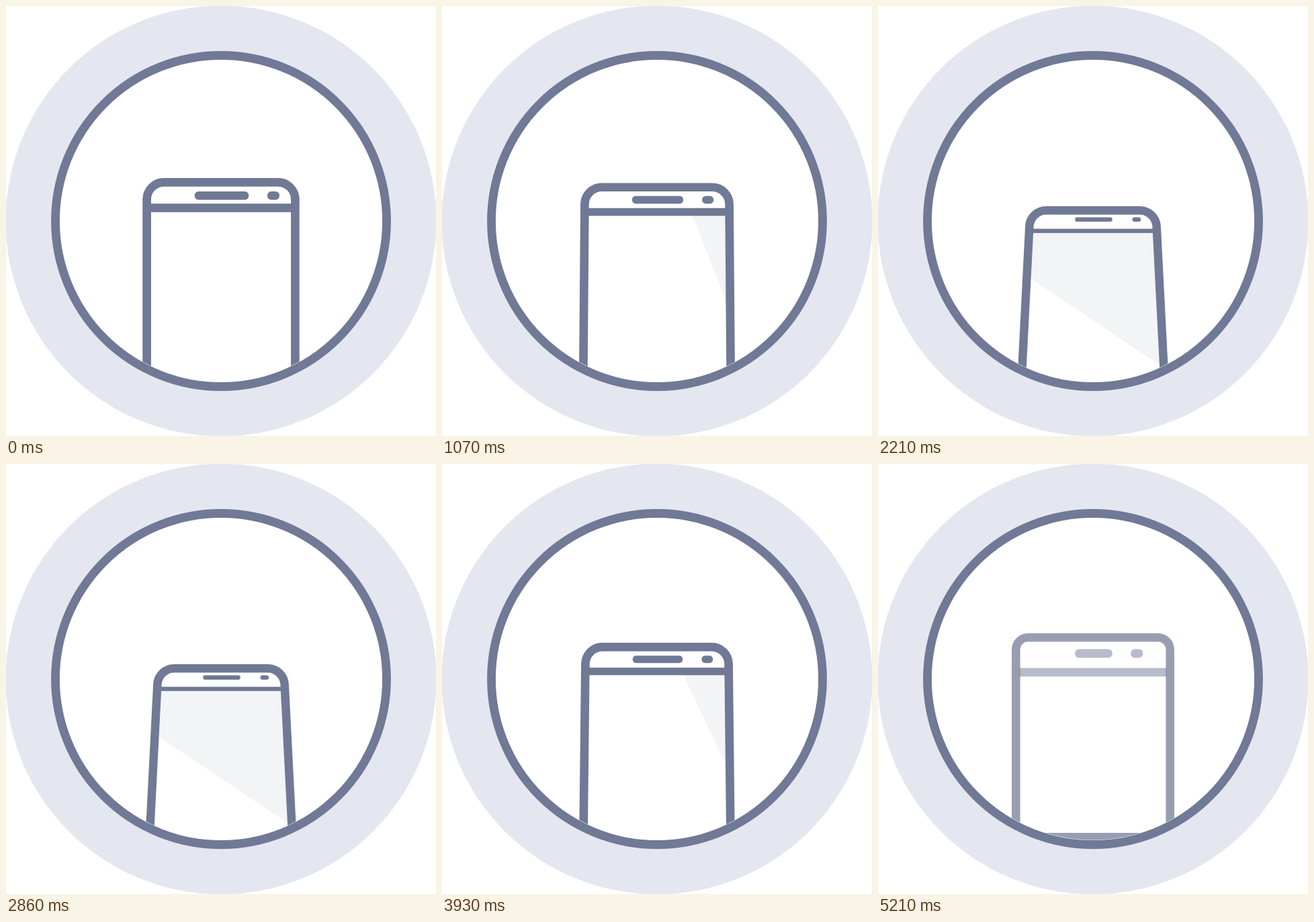
Write an HTML page with a canvas that moves like this. It is 640x640 px and loops after 5.29 s.

```html
<!DOCTYPE html>
<html lang="en">
<head>
<meta charset="utf-8">
<title>Tilting phone</title>
<style>
html, body { margin: 0; width: 100%; height: 100%; overflow: hidden; background: #fff; }
canvas { display: block; width: 100vmin; height: 100vmin; }
</style>
</head>
<body>
<canvas id="stage"></canvas>
<script>
const LOOP = 5290, SIZE = 640, C = 320;
const INK = '#707995', HALO = '#e4e7f0', GLARE = '#f2f4f6';
const canvas = document.getElementById('stage');
const ctx = canvas.getContext('2d');

const clamp = x => Math.min(1, Math.max(0, x));
const mix = (a, b, k) => a + (b - a) * k;
const smooth = x => { x = clamp(x); return x * x * (3 - 2 * x); };
const quint = x => {
  x = clamp(x);
  return x < 0.5 ? 16 * x ** 5 : 1 - 16 * (1 - x) ** 5;
};

// Each value: upright, tilted back, stretched out at the end
const POSE = {
  top: [262.4, 304.3, 258.2],
  bottom: [600, 600, 555.4],
  topInset: [110.4, 93.4, 114.7],
  footInset: [110.4, 108.6, 114.7],
  radius: [25.5, 25, 18],
  line: [12.7, 12.5, 12.6],
  barY: [300.5, 334.8, 310],
  barH: [12.7, 6.3, 12.7],
  slotX: [321, 321, 321],
  slotW: [80.5, 55.5, 55.5],
  dotX: [398, 384.8, 385.2],
  dotW: [18, 12.5, 18],
  slotY: [282.2, 317.7, 282],
  slotH: [12.5, 6.5, 13],
  bodyAlpha: [1, 1, 0.72],
  partAlpha: [1, 1, 0.5]
};

// Edge of the reflection by tilt: tilt, x1, y1, x2, y2
const EDGE = [
  [0, 425, 307, 425, 475],
  [0.02, 413, 308, 423.5, 460],
  [0.18, 372, 312, 423, 440],
  [0.87, 229, 347, 420, 533],
  [1, 228, 407, 420, 535]
];

function poseAt(tilt, morph) {
  const p = {};
  for (const key in POSE) {
    const [up, back, end] = POSE[key];
    p[key] = mix(mix(up, back, tilt), end, morph);
  }
  return p;
}

function edgeAt(tilt) {
  let i = 1;
  while (i < EDGE.length - 1 && tilt > EDGE[i][0]) i++;
  const a = EDGE[i - 1], b = EDGE[i];
  const k = clamp((tilt - a[0]) / (b[0] - a[0]));
  return a.slice(1).map((v, n) => mix(v, b[n + 1], k));
}

function disc(r) {
  ctx.beginPath();
  ctx.arc(C, C, r, 0, Math.PI * 2);
}

function body(p) {
  ctx.beginPath();
  ctx.moveTo(C, p.top);
  ctx.arcTo(C + p.topInset, p.top, C + p.footInset, p.bottom, p.radius);
  ctx.arcTo(C + p.footInset, p.bottom, C, p.bottom, p.radius);
  ctx.arcTo(C - p.footInset, p.bottom, C - p.topInset, p.top, p.radius);
  ctx.arcTo(C - p.topInset, p.top, C, p.top, p.radius);
  ctx.closePath();
}

function pill(x, y, w, h) {
  ctx.beginPath();
  ctx.roundRect(x - w / 2, y - h / 2, w, h, h * 0.46);
  ctx.fill();
}

function reflection(p, tilt) {
  const [x1, y1, x2, y2] = edgeAt(tilt);
  const dx = (x2 - x1) * 3, dy = (y2 - y1) * 3;
  ctx.save();
  body(p);
  ctx.clip();
  ctx.beginPath();
  ctx.rect(0, p.barY, SIZE, SIZE);
  ctx.clip();
  ctx.beginPath();
  ctx.moveTo(x1 - dx, y1 - dy);
  ctx.lineTo(x2 + dx, y2 + dy);
  ctx.lineTo(2000, y2 + dy);
  ctx.lineTo(2000, y1 - dy);
  ctx.fillStyle = GLARE;
  ctx.fill();
  ctx.restore();
}

function phone(p, tilt) {
  if (tilt > 0.003) reflection(p, tilt);
  ctx.globalAlpha = p.bodyAlpha;
  ctx.strokeStyle = INK;
  ctx.lineWidth = p.line;
  body(p);
  ctx.stroke();

  ctx.globalAlpha = p.partAlpha;
  ctx.fillStyle = INK;
  const drop = (p.barY - p.top) / (p.bottom - p.top);
  const half = mix(p.topInset, p.footInset, drop) - 5;
  ctx.fillRect(C - half, p.barY - p.barH / 2, half * 2, p.barH);
  pill(p.slotX, p.slotY, p.slotW, p.slotH);
  pill(p.dotX, p.slotY, p.dotW, p.slotH);
  ctx.globalAlpha = 1;
}

function draw(t) {
  const morph = smooth((t - 4600) / 610);
  const tilt = clamp(quint(t / 2640) - quint((t - 2430) / 2640)) * (1 - morph);

  ctx.fillStyle = '#fff';
  ctx.fillRect(0, 0, SIZE, SIZE);
  disc(320.5);
  ctx.fillStyle = HALO;
  ctx.fill();
  disc(246.5);
  ctx.fillStyle = '#fff';
  ctx.fill();
  ctx.strokeStyle = INK;
  ctx.lineWidth = 12.8;
  ctx.stroke();

  ctx.save();
  disc(239.7);
  ctx.clip();
  phone(poseAt(tilt, morph), tilt);
  ctx.restore();
}

function resize() {
  const side = Math.min(innerWidth, innerHeight) * (devicePixelRatio || 1);
  canvas.width = canvas.height = Math.round(side) || SIZE;
}

let start = null;
function tick() {
  const now = performance.now();
  if (start === null) start = now;
  ctx.setTransform(canvas.width / SIZE, 0, 0, canvas.height / SIZE, 0, 0);
  draw((now - start) % LOOP);
  requestAnimationFrame(tick);
}

addEventListener('resize', resize);
resize();
tick();
</script>
</body>
</html>
```
